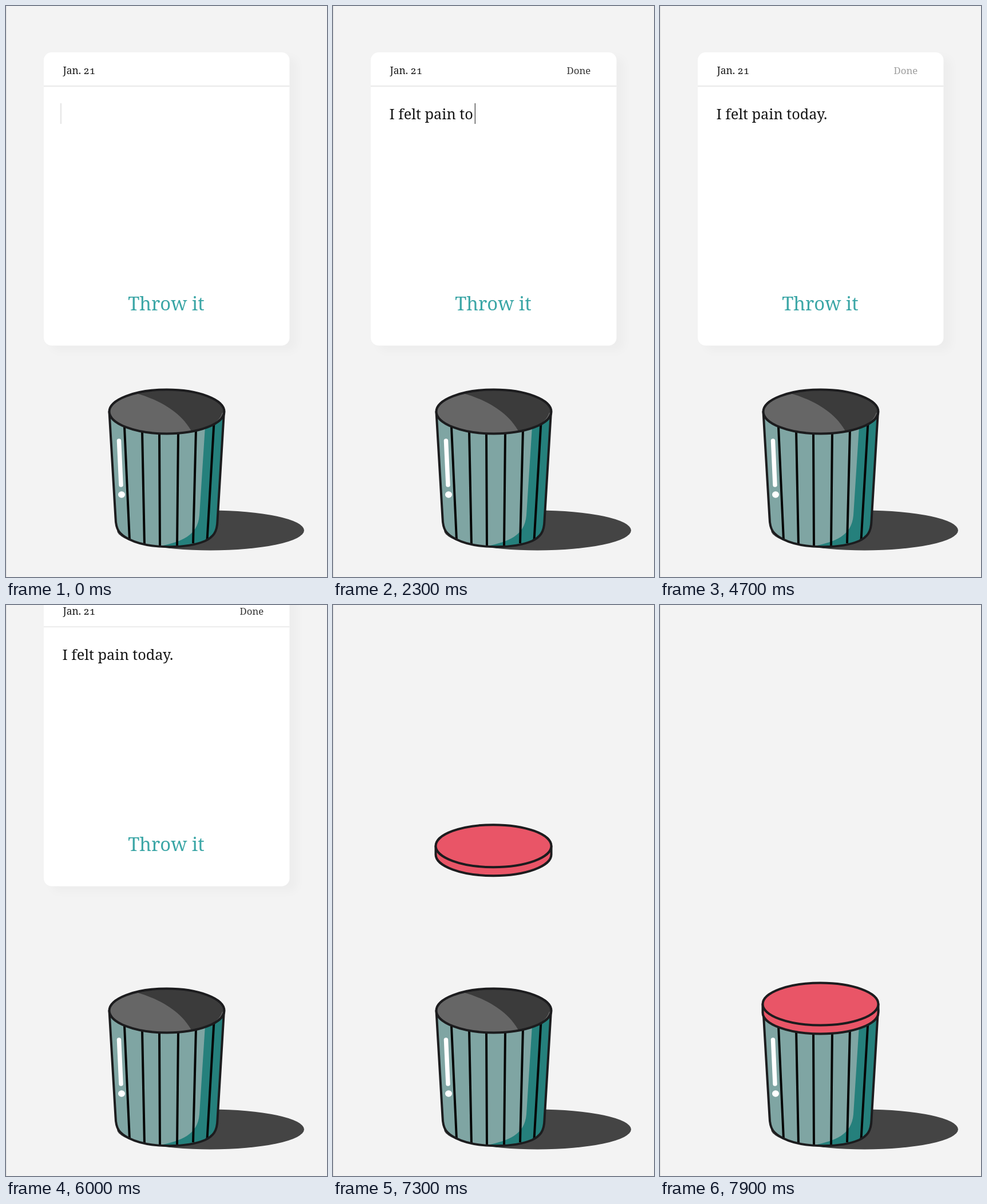
An HTML page for the animation above (8000 ms loop, 561 by 998 pixels).

```html
<!DOCTYPE html>
<html lang="en">
<head>
<meta charset="utf-8">
<title>Throw it</title>
<style>
  html, body { margin: 0; width: 100%; height: 100%; overflow: hidden; background: #f3f3f3; }
  svg { display: block; width: 561px; height: 998px; }
  text { font-family: Georgia, "Noto Serif", serif; font-variant-numeric: oldstyle-nums; white-space: pre; fill: #161616; }
  #sheet { filter: drop-shadow(13px 9px 7px rgba(0, 0, 0, .022)); }
  .ink { stroke: #1c1c1e; stroke-width: 4; stroke-linejoin: round; }
</style>
</head>
<body>
<svg viewBox="0 0 561 998">
  <defs>
    <path id="body" d="M180.5 709 L191.5 895 C192 916 198 923 215 932 C249 949 315 949 348 935 C362 928 369 920 369.5 900 L381 709 Z"/>
    <ellipse id="rim" cx="281" cy="709" rx="100.5" ry="38.5"/>
    <clipPath id="inBody"><use href="#body"/></clipPath>
    <clipPath id="inRim"><use href="#rim"/></clipPath>
  </defs>

  <path d="M.5 0V998" stroke="#dedede"/>

  <g id="card">
    <rect id="sheet" x="66" y="81" width="429.5" height="512.5" rx="14" fill="#fff"/>
    <path d="M66 140H495.5" stroke="#e2e2e2" stroke-width="1.3"/>
    <text x="99.5" y="118.5" font-size="17.4">Jan. 21</text>
    <text id="done" x="408.5" y="118.5" font-size="16.8">Done</text>
    <text id="note" x="98.5" y="198" font-size="25.3"></text>
    <path id="caret" d="M0 170V206" stroke="#333" stroke-width="1.2"/>
    <text x="280" y="532" font-size="32.7" text-anchor="middle" style="fill:#3ba6a6">Throw it</text>
  </g>

  <ellipse cx="357.5" cy="916.5" rx="163.5" ry="35" fill="#444"/>
  <use href="#body" fill="#7fa5a3"/>
  <g clip-path="url(#inBody)">
    <path d="M348 735 L338 890 C335 927 305 936 270 944 V960 H400 V709 Z" fill="#25807c"/>
    <path d="M207 736L216 934M238 742L242 943M268 745L269 946M301 745L299 945M332 740L327 939M363.5 728L351.5 934" stroke="#050505" stroke-width="4"/>
    <path d="M197.5 760L201 837" stroke="#fff" stroke-width="7.5" stroke-linecap="round"/>
    <ellipse cx="202" cy="854" rx="6" ry="5.7" fill="#fff"/>
  </g>
  <use href="#body" fill="none" class="ink"/>
  <use href="#rim" fill="#3b3b3b"/>
  <g clip-path="url(#inRim)">
    <path d="M228 677 C270 689 308 712 325 745 L300 760 H170 V660 Z" fill="#666"/>
    <path d="M378.5 711 C375 722 366 730 352 736" fill="none" stroke="#777" stroke-width="1"/>
  </g>
  <use href="#rim" fill="none" class="ink"/>

  <g id="lid" class="ink" fill="#e95567">
    <path d="M-101 0V15A101 37 0 0 0 101 15V0Z"/>
    <ellipse rx="101" ry="37"/>
  </g>
</svg>
<script>
const LOOP = 8000, MESSAGE = "I felt pain today.";
const [card, done, note, caret, lid] =
  ["card", "done", "note", "caret", "lid"].map(id => document.getElementById(id));

const ramp = (t, from, to) => Math.min(1, Math.max(0, (t - from) / (to - from)));
const ease = u => u < .5 ? 4 * u ** 3 : 1 - 4 * (1 - u) ** 3;

function draw(t) {
  // one letter every 100 ms
  const count = Math.max(0, Math.min(MESSAGE.length, Math.floor((t - 900) / 100)));
  const typed = MESSAGE.slice(0, count);
  if (note.textContent !== typed) note.textContent = typed;
  const caretX = count ? 98.5 + note.getComputedTextLength() + 3.5 : 96;
  caret.setAttribute("transform", `translate(${caretX} 0)`);

  const beat = t % 1000;
  const blink = .2 + .8 * ramp(beat, 0, 80) - ramp(beat, 400, 480);
  caret.setAttribute("opacity", t < 4500 && beat < 480 ? blink : 0);

  const press = ramp(t, 4450, 4650) - ramp(t, 4750, 5000);
  done.setAttribute("opacity", ramp(t, 1600, 2000) * (.88 - .46 * press));

  card.setAttribute("transform", `translate(0 ${-678 * ease(ramp(t, 5800, 6400))})`);
  lid.setAttribute("transform", `translate(280.5 ${-402.5 + 1100 * ease(ramp(t, 6939.5, 7539.5))})`);
}

const start = performance.now();
function tick() {
  draw((performance.now() - start) % LOOP);
  requestAnimationFrame(tick);
}
tick();
</script>
</body>
</html>
```
